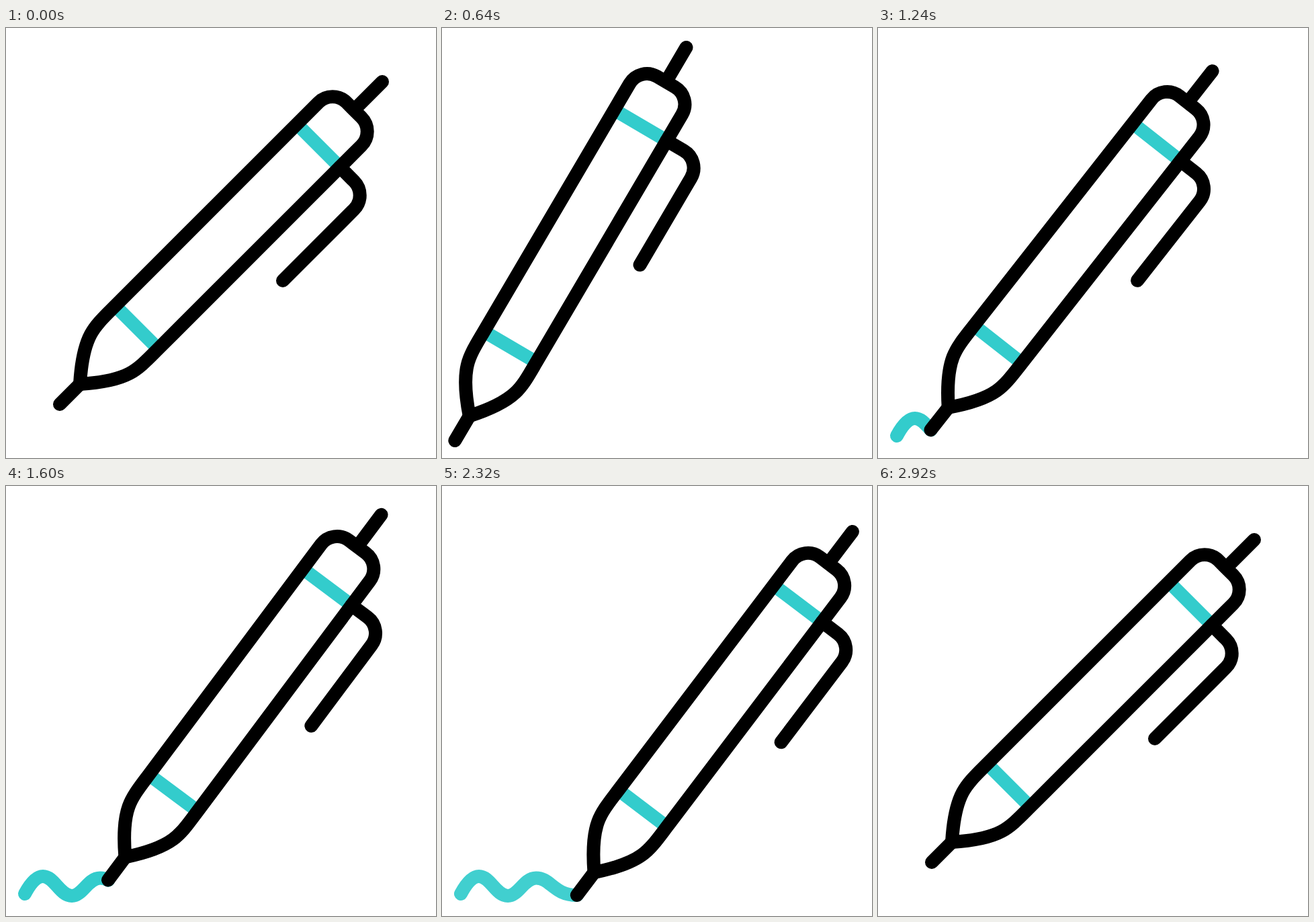
An HTML page that plays this animation: 640x640 px, repeating every 3000 ms.

```html
<!DOCTYPE html>
<html>
<head>
<meta charset="utf-8">
<style>
html, body { margin: 0; height: 100%; overflow: hidden; background: #fff; }
svg { display: block; width: 100%; height: 100%; }
path { fill: none; stroke: #000; stroke-width: 20; stroke-linecap: round; stroke-linejoin: round; }
.teal { stroke: #33cccc; }
</style>
</head>
<body>
<svg viewBox="0 0 640 640">
  <path id="trail" class="teal" d="M28 607C35 594 44 581 55 581C72 581 80 610 98 610C114 610 122 583.500 140 583.500C162 583.500 166 609 201 609"/>
  <g id="pen">
    <path class="teal" style="stroke-linecap:butt" d="M162.500 413.500l64 64M433 143l64 64"/>
    <path d="M110 530C112 496 118 471 126 456C134 441 147 429 162 414L465 111A29.700 29.700 0 0 1 507 111L529 133A29.700 29.700 0 0 1 529 175L226 478C211 493 199 506 184 514C169 522 144 528 110 530Z"/>
    <path d="M80 560L110 530M560 80L518.500 121.500M497 207L518 228A29.700 29.700 0 0 1 518 270L412 376"/>
  </g>
</svg>
<script>
const LOOP = 3000, LIFT = 100, TURN = 520, WRITE = 880, STOP = 2080, LEAVE = 2310;
const trail = document.getElementById('trail');
const pen = document.getElementById('pen');
const length = trail.getTotalLength();
const HALF = 240 * Math.SQRT2; // from the middle of the pen to its tip

const progress = (t, from, to) => Math.max(0, Math.min(1, (t - from) / (to - from)));
const smooth = u => u * u * (3 - 2 * u);
const ease = (t, from, to) => smooth(progress(t, from, to));
const mix = (a, b, p) => a + (b - a) * p;

// A pose is the middle of the pen and its tilt in degrees.
const rest = { x: 320, y: 320, tilt: 0 };
const raised = { x: 182, y: 320, tilt: -15.8 };

function blend(a, b, p, turn = p) {
  return { x: mix(a.x, b.x, p), y: mix(a.y, b.y, p), tilt: mix(a.tilt, b.tilt, turn) };
}

// The tip follows the trail while the tilt swings and dies down.
function writing(s) {
  const tip = trail.getPointAtLength(s * length);
  const tilt = -8 - 3 * Math.exp(-3 * s) * Math.cos(2 * Math.PI * s / 0.65);
  const angle = (45 - tilt) * Math.PI / 180;
  return { x: tip.x + HALF * Math.cos(angle), y: tip.y - HALF * Math.sin(angle), tilt };
}

function poseAt(t, s) {
  if (t < TURN) return blend(rest, raised, ease(t, LIFT, TURN));
  if (t < WRITE) return blend(raised, writing(0), ease(t, TURN, WRITE));
  return blend(writing(s), rest, ease(t, LEAVE, 2920), ease(t, LEAVE, 2820));
}

function draw(t) {
  const s = smooth(progress(t, WRITE, STOP) ** 0.8);
  const { x, y, tilt } = poseAt(t, s);
  pen.setAttribute('transform', `translate(${x} ${y}) rotate(${tilt}) translate(-320 -320)`);
  trail.style.strokeDasharray = `${s * length} ${length * 2}`;
  trail.style.opacity = t < WRITE ? 0 : 1 - progress(t, 2300, 2600);
}

const start = performance.now();
function frame() {
  draw((performance.now() - start) % LOOP);
  requestAnimationFrame(frame);
}
frame();
</script>
</body>
</html>
```
